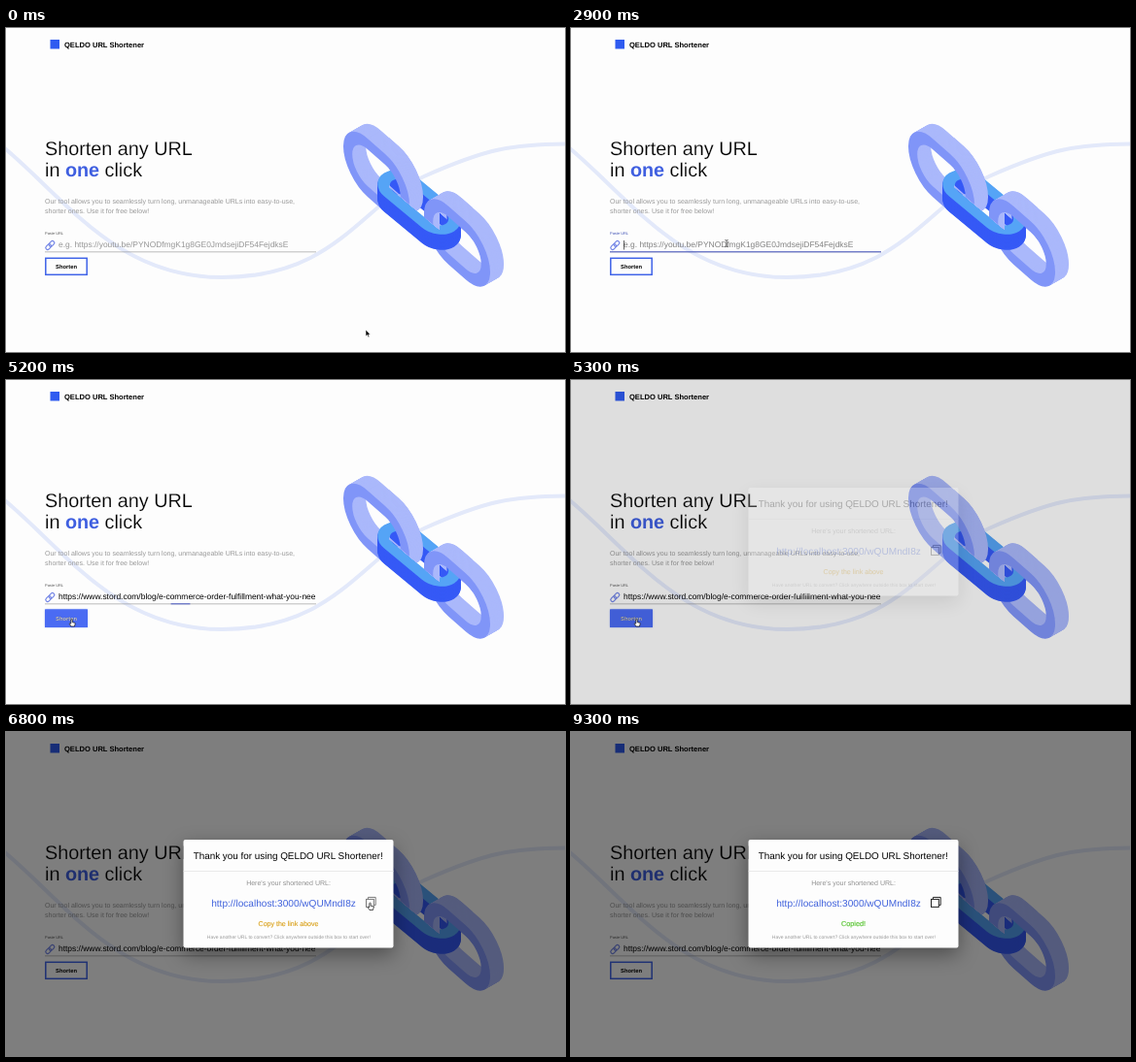
An HTML page for the animation above (9.4 s loop, 575 px wide and 334 px high).

```html
<!DOCTYPE html>
<html lang="en">
<head>
<meta charset="utf-8">
<title>URL Shortener</title>
<style>
  html, body { margin: 0; width: 100%; height: 100%; overflow: hidden; background: #fdfdfd; }
  svg { display: block; width: 575px; height: 334px; }
  text { font-family: "Liberation Sans", Arial, sans-serif; text-rendering: geometricPrecision; white-space: pre; }
  .bold { font-weight: 700; }
  .mid { text-anchor: middle; }
  .light { stroke: #fdfdfd; stroke-width: .2px; }
  #paper { filter: drop-shadow(0 7px 10px rgba(0, 0, 0, .38)); }
</style>
</head>
<body>
<svg viewBox="0 0 575 334">
  <defs>
    <clipPath id="frontA"><path d="M394 90H440V203L394 164Z"/></clipPath>
    <clipPath id="frontB"><path d="M424 150H480V222L446 190V208L424 190Z"/></clipPath>
  </defs>

  <path d="M-5 121C60 174 112 257 222 257C340 257 365 182 430 153S520 120 580 119.5" fill="none" stroke="#e3e9fa" stroke-width="4"/>
  <g id="chain"></g>

  <rect x="45.5" y="12" width="9.5" height="9.5" fill="#2f5bf0"/>
  <text class="bold" x="60" y="19.5" font-size="7.55">QELDO URL Shortener</text>

  <g font-size="19.8">
    <text class="light" x="40" y="130.6">Shorten any URL</text>
    <text class="light" x="40" y="153.3">in <tspan class="bold" fill="#3f5fe0" stroke="none">one</tspan> click</text>
  </g>
  <g font-size="7.02" fill="#999">
    <text x="40" y="181">Our tool allows you to seamlessly turn long, unmanageable URLs into easy-to-use,</text>
    <text x="40" y="191">shorter ones. Use it for free below!</text>
  </g>

  <text id="label" x="40" y="213" font-size="3.95">Paste URL</text>
  <g fill="none" stroke="#7486e6" stroke-width="1.2" transform="rotate(-45 45.3 224)">
    <rect x="39.8" y="222" width="6.4" height="4" rx="2"/>
    <rect x="44.4" y="222" width="6.4" height="4" rx="2"/>
  </g>
  <text id="hint" x="54" y="226.2" font-size="8.44">e.g. https://youtu.be/PYNODfmgK1g8GE0JmdsejiDF54FejdksE</text>
  <text id="value" x="54" y="226.2" font-size="8.43">https://www.stord.com/blog/e-commerce-order-fulfillment-what-you-nee</text>
  <rect id="caret" y="219" width=".6" height="9.5"/>
  <rect id="line" x="40" y="230.6" width="279" height=".6"/>
  <rect id="focusLine" y="230.3" height="1" fill="#4a5bc6"/>

  <rect x="40.8" y="237.3" width="42.4" height="17" fill="#fdfdfd" stroke="#3f63e8" stroke-width="1.5"/>
  <rect id="fill" x="40" y="236.5" width="44" height="18.6" rx=".8" fill="#4a6bf3" style="filter:drop-shadow(0 .8px 1px #4a6bf366)"/>
  <g class="bold mid" font-size="5.8">
    <text x="62" y="247.8">Shorten</text>
    <text id="lit" x="62" y="247.8" fill="#dfe5ff">Shorten</text>
  </g>

  <rect id="shade" width="575" height="334"/>
  <g id="dialog">
    <rect id="paper" x="182.5" y="111" width="216" height="111.5" rx="2" fill="#fdfdfd"/>
    <path d="M182.5 143.5H398.5" stroke="#e2e2e2" stroke-width=".7"/>
    <g class="mid">
      <text x="290.2" y="130.8" font-size="9.9">Thank you for using QELDO URL Shortener!</text>
      <text x="290.5" y="158" font-size="7.03" fill="#909090">Here's your shortened URL:</text>
      <text x="285.5" y="180" font-size="10.1" fill="#4062dc">http://localhost:3000/wQUMndI8z</text>
      <text id="copy" x="290.5" y="200" font-size="7.06" fill="#daa21d" stroke="#daa21d" stroke-width=".15">Copy the link above</text>
      <text id="copied" x="290.5" y="200" font-size="7.2" fill="#5cc636" stroke="#5cc636" stroke-width=".2">Copied!</text>
      <text x="290.8" y="213.3" font-size="5" fill="#999">Have another URL to convert? Click anywhere outside this box to start over!</text>
    </g>
    <g id="icon" fill="none" stroke="#222" stroke-width="1">
      <path d="M372.4 172.4V170.4H380.2V178.4H378.4"/>
      <rect x="370.5" y="172.4" width="7.8" height="8"/>
    </g>
  </g>

  <g id="pointer" stroke-linejoin="round">
    <path id="arrow" d="M0 0V6.8L1.6 5.4 2.7 7.8 3.8 7.3 2.8 5H4.8Z" stroke="#fff" stroke-width=".6"/>
    <path id="beam" d="M-1.6 -3.5Q0 -3.5 0 -2.5Q0 -3.5 1.6 -3.5M0 -2.5V2.7M-1.6 3.7Q0 3.7 0 2.7Q0 3.7 1.6 3.7" fill="none" stroke="#444" stroke-width=".8"/>
    <path id="hand" d="M-.7 0Q0 -.8 .7 0V2.7L3.2 3.3Q3.8 3.6 3.6 4.4L3 7H-.6L-2.4 4.2Q-2 3.3 -.7 4.2Z" fill="#fff" stroke="#111" stroke-width=".7"/>
  </g>
</svg>

<script>
const LOOP = 9400;
const $ = id => document.getElementById(id);
const set = (id, attrs) => { for (const k in attrs) $(id).setAttribute(k, attrs[k]); };
const show = (id, on) => set(id, { opacity: +on });

// A flattened ring, swept from its far end (dx, dy) to its face.
function link({ x, y, plane, w, h, dx, dy, side, face, clip }) {
  const ring = (k, color) =>
    `<rect x="${-w / 2}" y="${-h / 2}" width="${w}" height="${h}" rx="${h / 2}" stroke="${color}"
      transform="matrix(${plane} ${x + dx * k} ${y + dy * k})"/>`;
  let body = '';
  for (let i = 20; i > 0; i--) body += ring(i / 20, side);
  return `<g fill="none" stroke-width="11"${clip ? ` clip-path="url(#${clip})"` : ''}>${body}${ring(0, face)}</g>`;
}
const upright = { plane: '.84 .74 0 1', w: 70, h: 49, dx: 14, dy: -8, side: '#aab8fb', face: '#8095f8' };
const first = { ...upright, x: 381, y: 152 };
const last = { ...upright, x: 464, y: 221.5 };
const middle = { plane: '.82 .68 .8 -.5', w: 77, h: 30, x: 425, y: 179.5, dx: 0, dy: 16, side: '#3559f6', face: '#55a4f6' };
$('chain').innerHTML = link(first) + link(last) + link(middle)
  + link({ ...first, clip: 'frontA' }) + link({ ...last, clip: 'frontB' });

// cubic-bezier(x1, 0, x2, 1)
const bezier = (x1, x2) => x => {
  let lo = 0, hi = 1;
  for (let i = 0; i < 24; i++) {
    const s = (lo + hi) / 2, r = 1 - s;
    if (3 * x1 * s * r * r + 3 * x2 * s * s * r + s ** 3 < x) lo = s; else hi = s;
  }
  return lo * lo * (3 - 2 * lo);
};
const easeInOut = bezier(.4, .2), easeOut = bezier(0, .2);
const ramp = (t, start, length, ease = easeInOut) => ease(Math.min(1, Math.max(0, (t - start) / length)));

// Pointer stops: time, x, y
const stops = [[0, 370, 311], [250, 370, 311], [1000, 190, 229], [1500, 160, 222], [3600, 160, 222],
  [4000, 110, 252], [4400, 67.5, 247], [6050, 67.5, 247], [6700, 374.5, 176.5], [8150, 374.5, 176.5], [8900, 410, 4]];
function pointerAt(t) {
  const i = Math.max(1, stops.findIndex(s => s[0] > t));
  const [t0, x0, y0] = stops[i - 1], [t1, x1, y1] = stops[i];
  const k = (t - t0) / (t1 - t0), e = k * k * (3 - 2 * k);
  return [x0 + (x1 - x0) * e, y0 + (y1 - y0) * e];
}

const FOCUS = 2500, PASTE = 3500, BLUR = 5070, OPEN = 5244, COPIED = 7200, LEAVE = 8900;

function draw(t) {
  const gone = t >= LEAVE;
  const [x, y] = gone ? [-50, -50] : pointerAt(t);
  const within = (l, top, r, b) => x >= l && x <= r && y >= top && y <= b;
  const onPage = t < 5310;
  const onInput = onPage && within(40, 215, 319, 232);
  const onButton = onPage && within(40, 236, 84, 255);
  const onIcon = !onPage && within(369, 169, 381, 181);

  const focused = t >= FOCUS && t < BLUR, pasted = t >= PASTE;
  set('label', { fill: focused ? '#3f51b5' : '#555' });
  set('hint', { fill: focused ? '#808080' : '#959595' });
  show('hint', !pasted);
  show('value', pasted);
  const blinkStart = pasted ? PASTE : FOCUS;
  set('caret', { x: pasted ? 319 : 54 });
  show('caret', focused && (t - blinkStart) % 1000 < 500);
  set('line', { fill: onInput && !focused ? '#333' : '#8c8c8c' });
  const width = 279 * (ramp(t, FOCUS, 200, easeOut) - ramp(t, BLUR, 200, easeOut));
  set('focusLine', { x: 179.5 - width / 2, width });

  const lit = ramp(t, 4270, 250) - ramp(t, 5310, 250);
  show('fill', lit);
  show('lit', lit);

  const open = ramp(t, OPEN, 225);
  show('shade', open / 2);
  show('dialog', open);
  show('copy', t < COPIED);
  show('copied', t >= COPIED);
  show('icon', onIcon ? .6 : 1);

  set('pointer', { transform: `translate(${x} ${y})` });
  const shape = onInput ? 'beam' : onButton || onIcon ? 'hand' : 'arrow';
  for (const id of ['arrow', 'beam', 'hand']) show(id, id === shape);
}

const start = performance.now();
function tick() {
  draw((performance.now() - start) % LOOP);
  requestAnimationFrame(tick);
}
tick();
</script>
</body>
</html>
```
